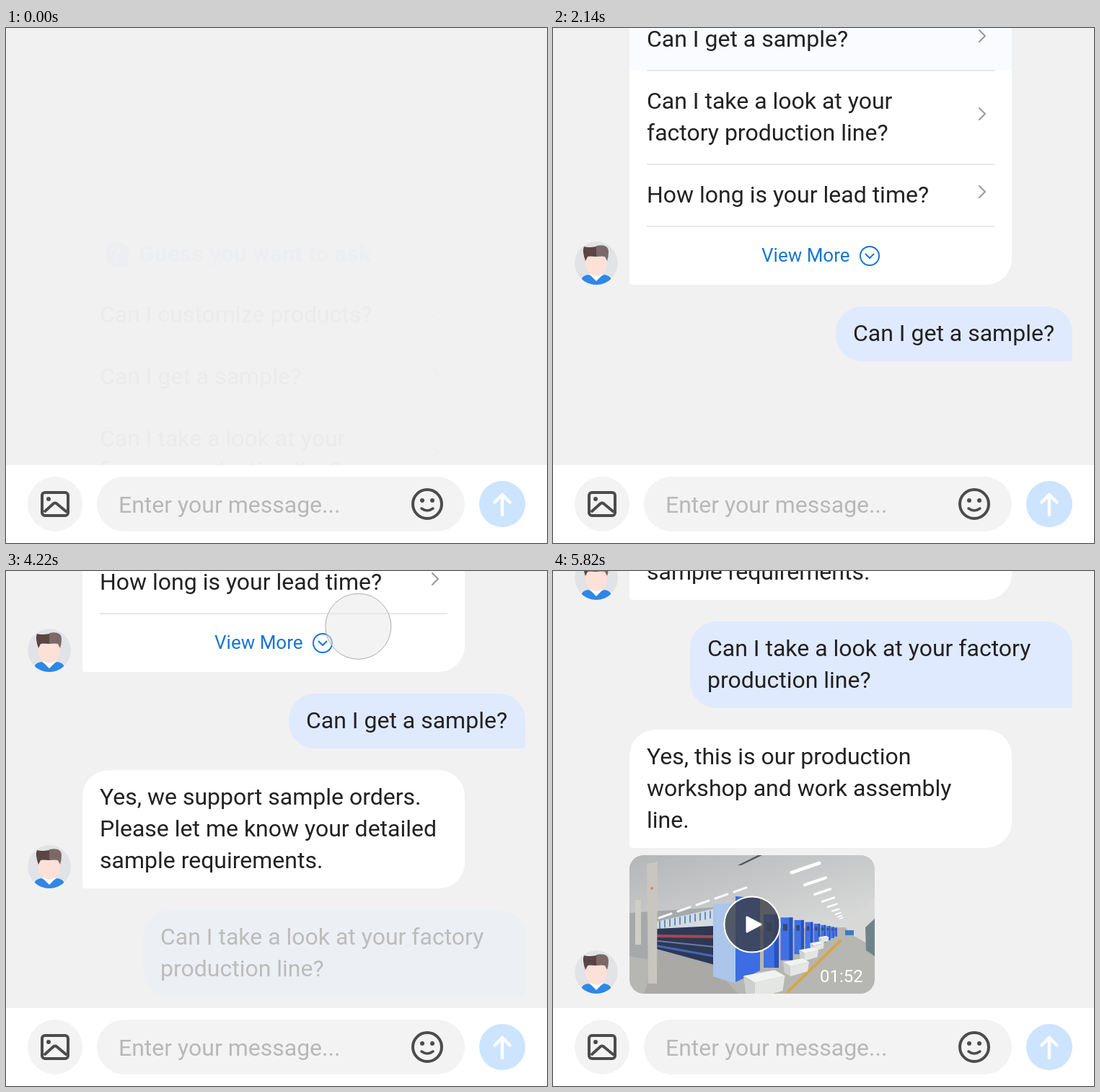
These frames come from a looping animation (750 px wide and 714 px high, 7.48 s). An HTML page:

```html
<!DOCTYPE html>
<html lang="en">
<head>
<meta charset="utf-8">
<title>Chat assistant</title>
<style>
  html, body { margin: 0; width: 100%; height: 100%; overflow: hidden; background: #f1f1f1; }
  svg { display: block; width: 750px; height: 714px; }
  text { font: 32px Roboto, sans-serif; fill: #222; }
  .line { fill: none; stroke-linecap: round; stroke-linejoin: round; }
</style>
</head>
<body>
<svg id="stage" viewBox="0 0 750 714"></svg>
<script>
const LOOP = 7480;

// ---------- drawing helpers ----------
const label = (x, y, str, attrs = '') => `<text x="${x}" y="${y}" ${attrs}>${str}</text>`;
const poly = (points, fill) => `<polygon points="${points}" fill="${fill}"/>`;
const line = (d, color, width) => `<path class="line" d="${d}" stroke="${color}" stroke-width="${width}"/>`;

// Rounded box whose tail corner (bottom left or bottom right) is almost square.
function bubblePath(x, y, w, h, tailLeft, r = 36) {
  const br = tailLeft ? r : 4, bl = tailLeft ? 4 : r;
  return `M${x + r} ${y}h${w - 2 * r}a${r} ${r} 0 0 1 ${r} ${r}v${h - r - br}` +
    `a${br} ${br} 0 0 1 ${-br} ${br}h${br + bl - w}a${bl} ${bl} 0 0 1 ${-bl} ${-bl}` +
    `v${r + bl - h}a${r} ${r} 0 0 1 ${r} ${-r}z`;
}

function bubble(x, y, w, lines, mine) {
  const h = 32 + 44 * lines.length;
  return `<path d="${bubblePath(x, y, w, h, !mine)}" fill="${mine ? '#e0eaff' : '#fff'}"/>` +
    lines.map((str, i) => label(x + 24, y + 48 + 44 * i, str)).join('');
}

const avatar = bottom => `
  <g transform="translate(60 ${bottom - 30})" clip-path="url(#disc)">
    <circle r="30" fill="#e2e3e6"/>
    <path d="M-20 30v-9q2-4 9-5l11 5 11-5q7 1 9 5v9z" fill="#2f87e6"/>
    <path d="M-8 10h16v7l-8 8-8-8z" fill="#fff"/>
    <path d="M-15-10h30V2q-1 10-9 14-6 4-12 0-8-4-9-14z" fill="#fde1d8"/>
    <path d="M-15-3q-5-14-2-20 6 2 17 0v14q-10-1-12 0z" fill="#5a4444"/>
    <path d="M0-24q17-3 17 8 0 7-2 13l-3-6q-4-1-12 0z" fill="#7b6968"/>
  </g>`;

const chevron = y => line(`M591 ${y - 8}l8 8-8 8`, '#999', 2);
const divider = y => `<path d="M130 ${y}h482" stroke="#e8e8e8" stroke-width="2"/>`;
const rowGlow = (id, y, h) => `<rect id="${id}" x="106" y="${y}" width="530" height="${h}" fill="#f9fbff"/>`;

const questionCard = () => `
  <path d="${bubblePath(106, 20, 530, 564, true)}" fill="#fff"/>
  <path d="M106 116V56a36 36 0 0 1 36-36h458a36 36 0 0 1 36 36v60z" fill="url(#header)"/>
  <path d="M153 56a18 18 0 0 1 14 29l3 7-9-1a18 18 0 1 1-8-35z" fill="#4f8efc"/>
  ${label(153, 82, '?', 'text-anchor="middle" style="font-size:25px;font-weight:500;fill:#fff"')}
  ${label(184, 84, 'Guess you want to ask', 'style="font-weight:700;fill:#4d8dff"')}
  ${rowGlow('glow1', 201, 86)}${rowGlow('glow2', 287, 130)}
  ${label(130, 168, 'Can I customize products?')}
  ${label(130, 254, 'Can I get a sample?')}
  ${label(130, 340, 'Can I take a look at your')}
  ${label(130, 384, 'factory production line?')}
  ${label(130, 470, 'How long is your lead time?')}
  ${[201, 287, 417, 503].map(divider).join('')}
  ${[153, 239, 347, 455].map(chevron).join('')}
  ${label(289, 552, 'View More', 'style="font-size:26px;fill:#1975d2"')}
  <circle cx="439" cy="544" r="13" fill="none" stroke="#1975d2" stroke-width="2"/>
  ${line('M433.500 541.500l5.500 5.500 5.500-5.500', '#1975d2', 2)}
  ${avatar(584)}`;

// Simplified workshop scene, 340 x 192.
function workshop() {
  let s = `<rect width="340" height="192" fill="#b6b6b2"/>
    <path d="M0 0H340V62L300 100 0 105z" fill="url(#ceiling)"/>` +
    poly('300,100 340,58 340,128 304,108', '#d8d9d6') +
    poly('0,80 120,72 120,160 0,140', '#a5a9aa') +
    poly('150,14 178,0 184,0 155,14', '#55585c');
  // Ceiling lights shrink toward the vanishing point.
  for (let i = 0; i < 9; i++) {
    const k = 0.76 ** i, x = 300 - 75 * k, y = 96 - 72 * k;
    s += line(`M${x} ${y}l${38 * k} ${-13 * k}`, '#fff', 1 + 4 * k);
  }
  for (let i = 0; i < 5; i++) s += line(`M${145 - 26 * i} ${51 + 9 * i}l17 -6`, '#f6f8fa', 3);
  // Spinning frame on the left.
  s += poly('38,92 118,74 118,100 38,108', '#d4dbe0');
  for (let i = 0; i < 11; i++) s += line(`M${42 + 7 * i} ${92 - 1.4 * i}v9`, '#5c8fc4', 2);
  s += poly('38,102 118,98 118,152 38,130', '#2d3854') +
    line('M40 112L117 113', '#a5484f', 4) +
    line('M40 119L117 127', '#6b7c9c', 2) + line('M40 126L117 140', '#4468b8', 3);
  s += poly('40,134 118,156 150,192 20,192', '#aaa9a6');
  // Columns.
  s += '<rect x="8" y="62" width="8" height="62" fill="#cfcdc7"/>' +
    poly('24,12 39,9 38,178 26,178', '#c9c6bf') + '<circle cx="31" cy="46" r="2" fill="#d88a5a"/>';
  // Cabinets receding to the right.
  s += poly('116,68 147,66 147,178 116,168', '#abc6ea') +
    poly('147,57 181,60 181,160 147,176', '#3c6de2');
  for (let i = 0; i < 9; i++) {
    const k = 0.8 ** i, x = 304 - 118 * k, y = 104 - 22 * k, w = 21 * k, h = 74 * k;
    s += `<rect x="${x}" y="${y}" width="${w}" height="${h}" fill="#3f70e4"/>` +
      `<rect x="${x + w * .7}" y="${y}" width="${w * .3}" height="${h}" fill="#2853b8"/>` +
      `<rect x="${x + w * .2}" y="${y + h * .15}" width="${w * .35}" height="${h * .16}" fill="#344a78"/>`;
  }
  s += line('M220 189L292 119', '#d7a548', 4);
  // White bins.
  for (const [x, y, k] of [[262, 113, .4], [250, 121, .55], [235, 130, .75], [213, 146, 1], [158, 164, 1.6]])
    s += `<g transform="translate(${x} ${y}) scale(${k})">` +
      poly('0,2 27,-3 36,2 10,8', '#f2f3f1') + poly('0,2 10,8 10,22 2,17', '#cdd0cf') +
      poly('10,8 36,2 34,15 10,22', '#e4e6e3') + '</g>';
  return s + '<rect x="299" y="104" width="12" height="7" fill="#3d7bc0"/>' +
    poly('327,100 340,88 340,140 328,132', '#71838a');
}

const video = (x, y) => `
  <g transform="translate(${x} ${y})">
    <g clip-path="url(#frame)">${workshop()}</g>
    <circle cx="170" cy="96" r="38.500" fill="#3d3f45" fill-opacity=".8" stroke="#fff" stroke-width="2"/>
    ${line('M163 86v20l19-10z', '#fff', 3).replace('class="line"', 'fill="#fff" stroke-linejoin="round"')}
    ${label(264, 176, '01:52', 'style="font-size:24px;fill:#fff"')}
  </g>`;

const inputBar = () => `
  <rect y="606" width="750" height="108" fill="#fff"/>
  <circle cx="68" cy="660" r="38" fill="#f3f3f3"/>
  <rect x="50" y="644" width="36" height="32" rx="4" fill="none" stroke="#4c4c4c" stroke-width="4"/>
  <circle cx="59" cy="653" r="3" fill="#4c4c4c"/>
  ${line('M54 670l11-10q3-3 6 0l12 10', '#4c4c4c', 4)}
  <rect x="126" y="622" width="510" height="76" rx="38" fill="#f3f3f3"/>
  ${label(156, 672, 'Enter your message...', 'style="fill:#b8b8b8"')}
  <circle cx="584" cy="660" r="20" fill="none" stroke="#4c4c4c" stroke-width="4"/>
  <circle cx="577" cy="655" r="3" fill="#4c4c4c"/><circle cx="591" cy="655" r="3" fill="#4c4c4c"/>
  ${line('M576 666q8 6 16 0', '#4c4c4c', 3.5)}
  <circle cx="688" cy="660" r="32" fill="#cce4fe"/>
  ${line('M688 675v-27M677.500 657.500l10.500-10.500 10.500 10.500', '#fff', 4.5)}`;

document.getElementById('stage').innerHTML = `
  <defs>
    <linearGradient id="header" x2="1" y2=".25">
      <stop stop-color="#f9fbff"/><stop offset="1" stop-color="#e6eeff"/>
    </linearGradient>
    <linearGradient id="ceiling" x2="1" y2="1">
      <stop stop-color="#b4b6b7"/><stop offset="1" stop-color="#dcdddd"/>
    </linearGradient>
    <clipPath id="disc"><circle r="30"/></clipPath>
    <clipPath id="frame"><rect width="340" height="192" rx="20"/></clipPath>
  </defs>
  <rect width="750" height="714" fill="#f1f1f1"/>
  <g id="chat">
    <g id="card">${questionCard()}</g>
    <g id="ask1">${bubble(392, 614, 328, ['Can I get a sample?'], true)}</g>
    <g id="reply1">
      ${bubble(106, 720, 530, ['Yes, we support sample orders.', 'Please let me know your detailed', 'sample requirements.'])}
      ${avatar(884)}
    </g>
    <g id="ask2">${bubble(190, 914, 530, ['Can I take a look at your factory', 'production line?'], true)}</g>
    <g id="reply2">
      ${bubble(106, 1064, 530, ['Yes, this is our production', 'workshop and work assembly', 'line.'])}
      ${video(106, 1238)}${avatar(1430)}
    </g>
  </g>
  <circle id="cursor" r="45.500" fill="#eaeaea" fill-opacity=".55" stroke="#adadad"/>
  ${inputBar()}`;

// ---------- animation ----------
const el = id => document.getElementById(id);
const ramp = (t, from, to) => Math.min(1, Math.max(0, (t - from) / (to - from)));
const easeOut = p => 1 - (1 - p) ** 2;
const easeInOut = p => p < .5 ? 2 * p * p : 1 - 2 * (1 - p) ** 2;
const fade = (id, value) => el(id).setAttribute('opacity', value);
const move = (id, x, y) => el(id).setAttribute('transform', `translate(${x} ${y})`);

// start, end, from x, from y, to x, to y
const cursorMoves = [
  [600, 1160, 836, 136, 392, 260],
  [1640, 2200, 392, 260, 726, 240],
  [3040, 3660, 815, 182, 478, 76],
  [4140, 4700, 478, 76, 726, 94],
];

function draw(t) {
  const enter = easeOut(ramp(t, 20, 340));
  const ask1 = easeOut(ramp(t, 1500, 1920));
  const shift1 = easeOut(ramp(t, 2140, 2440));
  const ask2 = easeOut(ramp(t, 4000, 4420));
  const reply2 = easeOut(ramp(t, 4640, 5060));

  const scroll = 227 * ask1 + 85 * shift1 + 170 * ask2 + 362 * reply2;
  move('chat', 0, Math.round(240 * (1 - enter) - scroll));
  fade('card', .03 + .97 * enter);
  fade('ask1', ramp(ask1, .5, 1));
  fade('reply1', easeOut(ramp(t, 2440, 2740)));
  fade('ask2', ramp(ask2, .7, 1));
  fade('reply2', reply2);
  fade('glow1', ramp(t, 1380, 1440) - ramp(t, 2140, 2300));
  fade('glow2', ramp(t, 3880, 3940));

  const [start, end, x0, y0, x1, y1] = cursorMoves.findLast(m => t >= m[0]) || cursorMoves[0];
  const p = easeInOut(ramp(t, start, end));
  move('cursor', x0 + (x1 - x0) * p, y0 + (y1 - y0) * p);
  fade('cursor', 1 - (t < 2600 ? ramp(t, 2060, 2120) : ramp(t, 5760, 5820)));
}

const began = performance.now();
function tick() {
  draw((performance.now() - began) % LOOP);
  requestAnimationFrame(tick);
}
tick();
</script>
</body>
</html>
```
